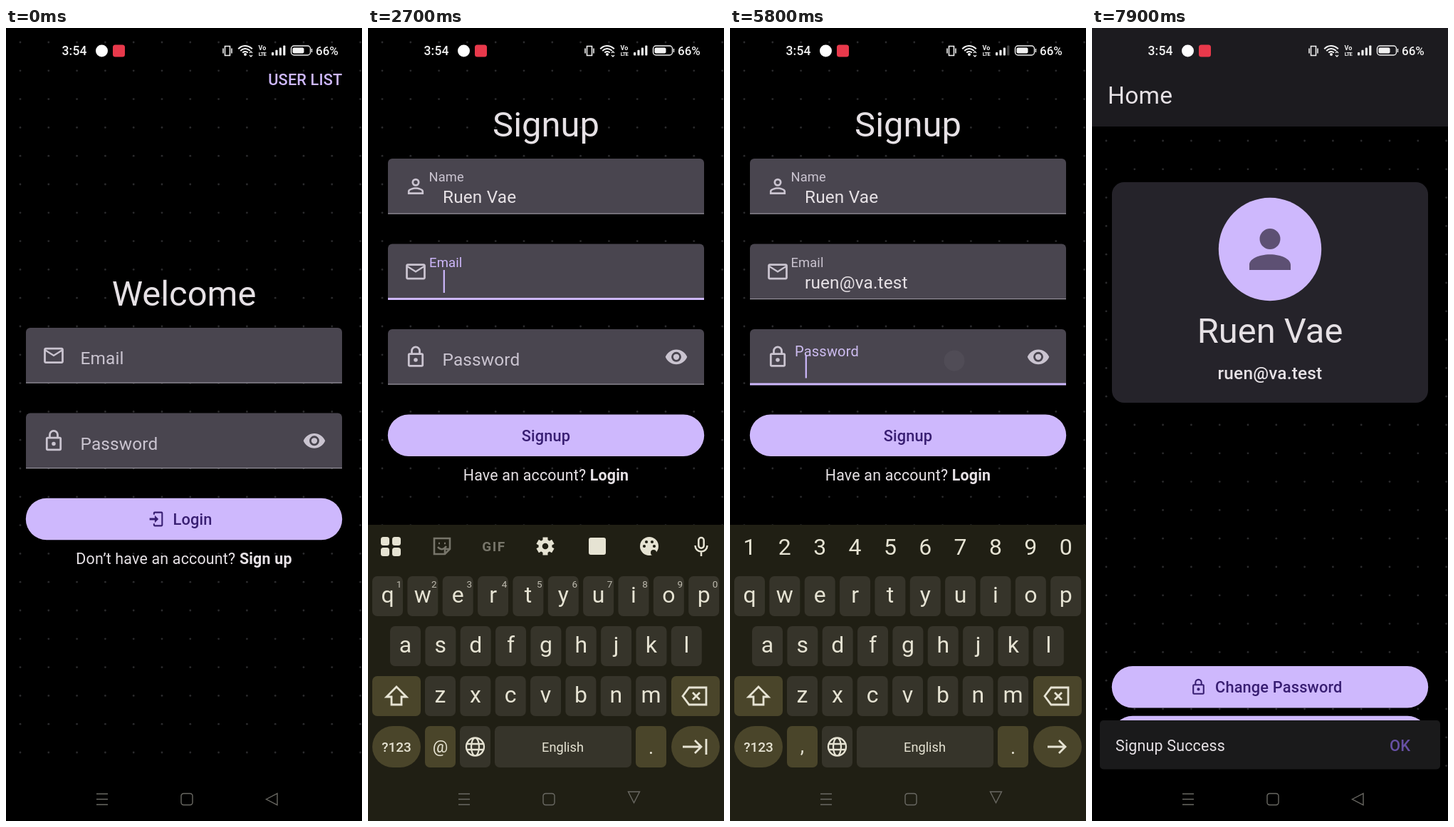
Write an HTML page with a canvas that moves like this. It is 500 by 1111 pixels and loops after 8 s.

```html
<!DOCTYPE html>
<html lang="en">
<head>
<meta charset="utf-8">
<title>Signup flow</title>
<style>
html, body { margin: 0; width: 100%; height: 100%; overflow: hidden; background: #000; }
canvas { display: block; }
</style>
</head>
<body>
<canvas id="stage" width="500" height="1111"></canvas>
<script>
const LOOP = 8000, NEVER = 1e9;
const ctx = document.getElementById('stage').getContext('2d');
const PURPLE = '#ceb8fd', INK = '#381e72', TEXT = '#e6e1e5', GREY = '#cac4d0';
const KEY_TEXT = '#e6e3d3', BOARD = '#201f14', KEY = '#36342a', MOD = '#4a452a';

const NAME = 'Ruen Vae', EMAIL = 'ruen@va.test', PASS = 'ruenvae';
const nameTimes = [1350, 1480, 1600, 1700, 1830, 2030, 2140, 2250];
const emailTimes = [2900, 3100, 3420, 3850, 4190, 4800, 4940, 5060, 5180, 5300, 5400, 5500];
const passTimes = [5980, 6110, 6240, 6380, 6520, 6650, 6790];
const shiftTimes = [1240, 1930];
const focusAt = { name: 700, email: 2555, pass: 5695 };

const icons = {
  mail: 'M22 6c0-1.1-.9-2-2-2H4c-1.1 0-2 .9-2 2v12c0 1.1.9 2 2 2h16c1.1 0 2-.9 2-2zm-2 0l-8 5-8-5zm0 12H4V8l8 5 8-5z',
  lock: 'M12 17a2 2 0 0 1 0-4a2 2 0 0 1 0 4zM18 20V10H6v10zM18 8a2 2 0 0 1 2 2v10a2 2 0 0 1-2 2H6a2 2 0 0 1-2-2V10a2 2 0 0 1 2-2h1V6a5 5 0 0 1 10 0v2zM12 3a3 3 0 0 0-3 3v2h6V6a3 3 0 0 0-3-3z',
  person: 'M12 4a4 4 0 0 1 0 8a4 4 0 0 1 0-8zm0 2a2 2 0 0 0 0 4a2 2 0 0 0 0-4zm0 7c2.67 0 8 1.33 8 4v3H4v-3c0-2.67 5.33-4 8-4zm0 1.9c-2.97 0-6.1 1.46-6.1 2.1v1.1h12.2V17c0-.64-3.13-2.1-6.1-2.1z',
  avatar: 'M12 4a4 4 0 0 1 0 8a4 4 0 0 1 0-8zm0 10c4.42 0 8 1.79 8 4v2H4v-2c0-2.21 3.58-4 8-4z',
  eye: 'M12 9a3 3 0 0 0 0 6a3 3 0 0 0 0-6zm0 8a5 5 0 0 1 0-10a5 5 0 0 1 0 10zm0-12.5C7 4.5 2.73 7.61 1 12c1.73 4.39 6 7.5 11 7.5s9.27-3.11 11-7.5c-1.73-4.39-6-7.5-11-7.5z',
  login: 'M10 17v-3.5H3v-3h7V7l5 5zM10 2h9a2 2 0 0 1 2 2v16a2 2 0 0 1-2 2h-9a2 2 0 0 1-2-2v-2h2v2h9V4h-9v2H8V4a2 2 0 0 1 2-2z'
};

const clamp = v => Math.max(0, Math.min(1, v));
const ramp = (t, a, b) => clamp((t - a) / (b - a));
const smooth = (t, a, b) => { const p = ramp(t, a, b); return p * p * (3 - 2 * p); };
const mix = (a, b, p) => a + (b - a) * p;

function text(s, x, y, size, color, weight = 400, align = 'left', gap = .15) {
  ctx.font = `${weight} ${size}px Roboto, "Noto Sans", sans-serif`;
  ctx.letterSpacing = gap + 'px';
  ctx.textAlign = align;
  ctx.fillStyle = color;
  ctx.fillText(s, x, y);
  return ctx.measureText(s).width;
}
function box(x, y, w, h, r, color) {
  ctx.fillStyle = color;
  ctx.beginPath();
  ctx.roundRect(x, y, w, h, r);
  ctx.fill();
}
function disc(x, y, r, color) {
  ctx.fillStyle = color;
  ctx.beginPath();
  ctx.arc(x, y, r, 0, 7);
  ctx.fill();
}
function icon(name, x, y, size, color) {
  ctx.save();
  ctx.translate(x - size / 2, y - size / 2);
  ctx.scale(size / 24, size / 24);
  ctx.fillStyle = color;
  ctx.fill(new Path2D(icons[name]), 'evenodd');
  ctx.restore();
}
function line(d, x, y, color, width, angle = 0) {
  ctx.save();
  ctx.translate(x, y);
  ctx.rotate(angle);
  ctx.strokeStyle = color;
  ctx.lineWidth = width;
  ctx.stroke(new Path2D(d));
  ctx.restore();
}
// Draws a part faded and shifted down
function layer(alpha, dy, draw) {
  if (alpha <= 0) return;
  ctx.save();
  ctx.globalAlpha = alpha;
  ctx.translate(0, dy);
  draw();
  ctx.restore();
}

function dots(top, alpha) {
  const old = ctx.globalAlpha;
  ctx.globalAlpha = old * alpha;
  for (let y = top + 20; y < 1050; y += 39.8)
    for (let x = 20; x < 500; x += 39.8) disc(x, y, 1.4, '#2b2b2d');
  ctx.globalAlpha = old;
}
const pill = (y, color) => box(27.8, y - .2, 444.4, 58.4, 29.2, color);
function button(y, label, ico, x) {
  pill(y, PURPLE);
  if (ico) icon(ico, x - 23.5, y + 29, 25, INK);
  text(label, ico ? x : 250, y + 37, 21.8, INK, 500, ico ? 'left' : 'center');
}
function prompt(y, ask, action) {
  const font = weight => ctx.font = `${weight} 21.4px Roboto, "Noto Sans", sans-serif`;
  ctx.letterSpacing = '.2px';
  font(700);
  const bold = ctx.measureText(action).width;
  font(400);
  const x = 250 - (bold + ctx.measureText(ask).width) / 2;
  const w = text(ask, x, y, 21.4, TEXT, 400, 'left', .2);
  text(action, x + w, y, 21.4, TEXT, 700, 'left', .2);
}

function field(t, y, label, ico, start = NEVER, end = NEVER, value = '', lastKey = 0) {
  const p = ramp(t, start, start + 150), active = t >= start && t < end;
  box(28, y, 444, 77.5, [6, 6, 0, 0], '#49454f');
  ctx.fillStyle = active ? PURPLE : '#98949e';
  ctx.fillRect(28, active ? y + 75.5 : y + 76.5, 444, active ? 3 : 1.2);
  icon(ico, 67, y + 38.8, 33.3, GREY);
  if (label === 'Password') icon('eye', 433, y + 38.8, 33.3, GREY);
  const tint = active ? `rgb(${mix(202, 206, p)},${mix(196, 184, p)},${mix(208, 253, p)})` : GREY;
  text(label, mix(104.5, 85.5, p), y + mix(51, 32, p), mix(24.4, 18.3, p), tint);
  const w = text(value, 105, y + 62, 24.4, TEXT);
  if (active && (t - Math.max(start, lastKey)) % 1000 < 500) {
    ctx.fillStyle = PURPLE;
    ctx.fillRect(105.7 + w, y + 36.5, 2.2, 32);
  }
}

function loginScreen(t) {
  dots(0, 1);
  text('USER LIST', 472.3, 80, 21.8, PURPLE, 500, 'right', .1);
  text('Welcome', 250, 389, 48.9, TEXT, 400, 'center', 0);
  field(t, 420, 'Email', 'mail');
  field(t, 539.5, 'Password', 'lock');
  button(659, 'Login', 'login', 234.5);
  prompt(751, 'Don’t have an account? ', 'Sign up');
}

const count = (times, t) => times.filter(x => x <= t).length;
const lastOf = (times, t) => times[count(times, t) - 1] || 0;

function signupScreen(t) {
  const y = t < 740 ? 363 : 183;
  ctx.fillStyle = '#000';
  ctx.fillRect(0, 0, 500, 1111);
  dots(0, mix(.3, 1, ramp(t, 900, 1200)));
  text('Signup', 250, y - 31, 48.9, TEXT, 400, 'center', 0);
  field(t, y, 'Name', 'person', focusAt.name, focusAt.email,
    NAME.slice(0, count(nameTimes, t)), lastOf(nameTimes, t));
  field(t, y + 119.5, 'Email', 'mail', focusAt.email, focusAt.pass,
    EMAIL.slice(0, count(emailTimes, t)), lastOf(emailTimes, t));
  const n = count(passTimes, t), last = lastOf(passTimes, t);
  const shown = n && t - last < 1500 ? '•'.repeat(n - 1) + PASS[n - 1] : '•'.repeat(n);
  field(t, y + 239, 'Password', 'lock', focusAt.pass, NEVER, shown, last);
  button(y + 358.7, 'Signup');
  if (t > 7250) {
    // The ripple drifts to the middle of the button as it grows
    const age = t - 7250, x = Math.max(250, 403 - age), r = 65 + age;
    const glow = ctx.createRadialGradient(x, y + 388, 0, x, y + 388, r);
    glow.addColorStop(0, 'rgba(56,30,114,.14)');
    glow.addColorStop(.55, 'rgba(56,30,114,.12)');
    glow.addColorStop(1, 'rgba(56,30,114,0)');
    pill(y + 358.7, glow);
    text('Signup', 250, y + 395.7, 21.8, INK, 500, 'center');
  }
  prompt(y + 451, 'Have an account? ', 'Login');
}

function homeScreen() {
  ctx.fillStyle = '#000';
  ctx.fillRect(0, 0, 500, 1111);
  dots(138, 1);
  ctx.fillStyle = '#1c1b1f';
  ctx.fillRect(0, 0, 500, 138);
  text('Home', 22, 106, 33.6, TEXT, 400, 'left', .2);
  box(28, 216, 444, 309, 17, '#25232a');
  disc(250, 310, 72.2, PURPLE);
  icon('avatar', 250, 310, 87, '#5d5073');
  text(NAME, 250, 441, 48.9, TEXT, 400, 'center', 0);
  text(EMAIL, 250, 492, 24.4, TEXT, 500, 'center', .2);
  button(894.3, 'Change Password', 'lock', 173);
  button(964, 'Logout', 'login', 228);
}
function snackbar(p) {
  layer(p, 0, () => {
    const s = mix(.9, 1, p);
    ctx.translate(250, 1004);
    ctx.scale(s, s);
    ctx.translate(-250, -1004);
    box(11, 970, 478, 68.5, 5, '#1a1a1b');
    text('Signup Success', 33, 1013, 21.4, TEXT, 400, 'left', .2);
    text('OK', 418, 1013, 21.8, '#6750a4', 500);
  });
}

// Letter keys: character and centre
const keys = [['qwertyuiop', 27.5, 796], ['asdfghjkl', 52.5, 866], ['zxcvbnm', 101.5, 936]]
  .flatMap(([row, x, y]) => [...row].map((c, i) => ({ c, x: x + i * 49.35, y })));
const spots = { ' ': [274, 1007], '@': [101, 1007], '.': [398, 1007], shift: [40, 936] };
const spot = c => {
  const k = keys.find(k => k.c === c.toLowerCase());
  return k ? [k.x, k.y] : spots[c];
};
const typing = (s, times) => times.map((t, i) => [t - 50, ...spot(s[i])]);
const taps = [
  [90, 365, 744], [600, 240, 402], [2450, 280, 345], [5605, 315, 466], [7250, 403, 563],
  ...shiftTimes.map(t => [t - 50, ...spots.shift]),
  ...typing(NAME, nameTimes), ...typing(EMAIL, emailTimes), ...typing(PASS, passTimes)
];

function toolbar(y) {
  for (const [dx, dy] of [[-14, -13], [2, -13], [-14, 2], [2, 2]]) box(32 + dx, y + dy, 12, 12, 3.5, KEY_TEXT);
  line('M-11-11H11V4L4 11H-11ZM11 4H4V11M-6 1Q0 8 6 0M-5-4h2M3-4h2', 104, y, '#77756a', 2.6);
  text('GIF', 177, y + 7, 19, '#77756a', 700, 'center', 1.5);
  for (let i = 0; i < 3; i++) line('M0-12.5V12.5', 249, y, KEY_TEXT, 7, i * Math.PI / 3);
  disc(249, y, 9.5, KEY_TEXT);
  disc(249, y, 4.3, BOARD);
  box(310, y - 12, 24, 24, 3, KEY_TEXT);
  disc(395, y, 13, KEY_TEXT);
  for (const [dx, dy] of [[-7, 0], [-4, -6], [4, -6], [7, 0]]) disc(395 + dx, y + dy, 2.1, BOARD);
  disc(401, y + 9, 4, BOARD);
  line('M0-12a3.7 3.7 0 0 1 3.7 3.7V-1a3.7 3.7 0 0 1-7.4 0V-8.3A3.7 3.7 0 0 1 0-12M-8.5-1a8.5 8.5 0 0 0 17 0M0 8V14', 468, y, KEY_TEXT, 2.5);
}
function keyboard(t) {
  const pass = t >= 5720, email = t >= 2620 && !pass;
  const upper = shiftTimes.some((s, i) => t >= s && t < nameTimes[i ? 5 : 0]);
  const held = (x, y) => taps.some(k => k[1] === x && k[2] === y && t >= k[0] && t < k[0] + 100);
  ctx.fillStyle = BOARD;
  ctx.fillRect(0, 696, 500, 900);
  if (!pass) toolbar(726);
  keys.forEach(({ c, x, y }, i) => {
    box(x - 21.5, y - 28, 43, 56, 7, held(x, y) ? '#57554a' : KEY);
    text(upper ? c.toUpperCase() : c, x, y + 9, 32, KEY_TEXT, 400, 'center', 0);
    if (i > 9) return;
    const digit = (i + 1) % 10;
    if (pass) text(digit, x, 738, 32, KEY_TEXT, 400, 'center', 0);
    else text(digit, x + 16, 784, 13.5, '#bdbaae', 400, 'center', 0);
  });
  box(6, 908, 68, 56, 7, upper ? '#6d663f' : MOD);
  line('M0-13L14 1H7V12H-7V1H-14Z', 40, 936, KEY_TEXT, 2.8);
  box(426, 908, 68, 56, 7, MOD);
  line('M-17 0L-8-12H16V12H-8ZM-3-5L7 5M7-5L-3 5', 459, 936, KEY_TEXT, 2.8);
  box(6, 978, 68, 58, 29, MOD);
  text('?123', 40, 1014, 19, KEY_TEXT, 500, 'center', 0);
  box(80, 978, 43, 58, 7, MOD);
  text(email ? '@' : ',', 101.5, 1015, email ? 24 : 27, KEY_TEXT, 400, 'center', 0);
  box(129, 978, 43, 58, 7, KEY);
  line('M-12.5 0a12.5 12.5 0 0 1 25 0a12.5 12.5 0 0 1-25 0M-5.5 0a5.5 12.5 0 0 1 11 0a5.5 12.5 0 0 1-11 0M-12-4H12M-12 4H12', 150.5, 1007, KEY_TEXT, 2.3);
  box(178, 978, 192, 58, 7, held(274, 1007) ? '#57554a' : KEY);
  text('English', 273.5, 1014, 18.2, KEY_TEXT, 400, 'center', 0);
  box(376, 978, 43, 58, 7, MOD);
  text('.', 397.5, 1017, 27, KEY_TEXT, 400, 'center', 0);
  box(426, 978, 68, 58, 29, MOD);
  if (pass) line('M-13 0H12M3-9L12 0L3 9', 459, 1007, KEY_TEXT, 2.8);
  else line('M-17 0H9M0-9L9 0L0 9M16-11V11', 459, 1007, KEY_TEXT, 2.8);
}

function statusBar(t) {
  const white = '#f1f1f1';
  text('3:54', 78.5, 38, 17.5, white, 500);
  disc(134.5, 32, 8.5, '#fff');
  box(150, 23.5, 17, 17, 3.5, '#e8394b');
  line('M-3.5-6.5h7V6.5h-7ZM-6-3.5V3.5M6-3.5V3.5', 311, 32, white, 1.6);
  for (const r of [5, 9, 13]) {
    ctx.strokeStyle = white;
    ctx.lineWidth = 2;
    ctx.beginPath();
    ctx.arc(336, 38, r, Math.PI * 1.23, Math.PI * 1.77);
    ctx.stroke();
  }
  disc(336, 37, 2, white);
  line('M-2-1L0-3L2-1M-2 2L0 4L2 2', 344, 36, white, 1.3);
  text('Vo', 360, 31, 9, white, 700, 'center', 0);
  text('LTE', 360, 39, 7.5, white, 700, 'center', -.5);
  for (let i = 0; i < 4; i++) {
    const h = 4.5 + i * 3.2;
    box(373 + i * 5.4, 38.5 - h, 3.2, h, 1, i === 3 && t > 5400 && t < 6300 ? '#444' : white);
  }
  line('M-10-6.5H9a4 4 0 0 1 4 4V2.5a4 4 0 0 1-4 4H-10a4 4 0 0 1-4-4V-2.5a4 4 0 0 1 4-4ZM15-2.5V2.5', 414.5, 31.5, white, 1.4);
  box(402.5, 27.5, 16, 8, 2, white);
  text('66%', 435, 38, 17, white, 500, 'left', 0);
}
function navBar(turn) {
  const c = '#6a6963';
  line('M-8-7.5H8M-8 0H8M-8 7.5H8', 135, 1080.5, c, 1.4);
  line('M-4.5-8H4.5A3.5 3.5 0 0 1 8-4.5V4.5A3.5 3.5 0 0 1 4.5 8H-4.5A3.5 3.5 0 0 1-8 4.5V-4.5A3.5 3.5 0 0 1-4.5-8Z', 254, 1080.5, c, 1.4);
  line('M-8 0L7.5-8V8Z', 373.5, mix(1080.5, 1077.5, turn), c, 1.4, -turn * Math.PI / 2);
}
function touches(t) {
  for (const [start, x, y] of taps) {
    if (t < start) continue;
    const a = .35 * (1 - ramp(t, start + 110, start + 210));
    if (a > 0) disc(x, y, 14.5, `rgba(235,235,240,${a})`);
  }
}

function draw(t) {
  ctx.globalAlpha = 1;
  ctx.fillStyle = '#000';
  ctx.fillRect(0, 0, 500, 1111);
  const signup = smooth(t, 200, 450), home = smooth(t, 7470, 7700);
  const board = smooth(t, 760, 1060) * (1 - smooth(t, 7520, 7720));
  if (signup < 1) loginScreen(t);
  if (home < 1) layer(signup, (1 - signup) * 80, () => signupScreen(t));
  layer(home, (1 - home) * 80, homeScreen);
  if (board > 0) layer(.3 + .7 * board, (1 - board) * 415, () => keyboard(t));
  snackbar(ramp(t, 7760, 7900));
  statusBar(t);
  navBar(smooth(t, 1060, 1200) * (1 - smooth(t, 7580, 7700)));
  touches(t);
}
function tick() {
  draw(performance.now() % LOOP);
  requestAnimationFrame(tick);
}
tick();
</script>
</body>
</html>
```
